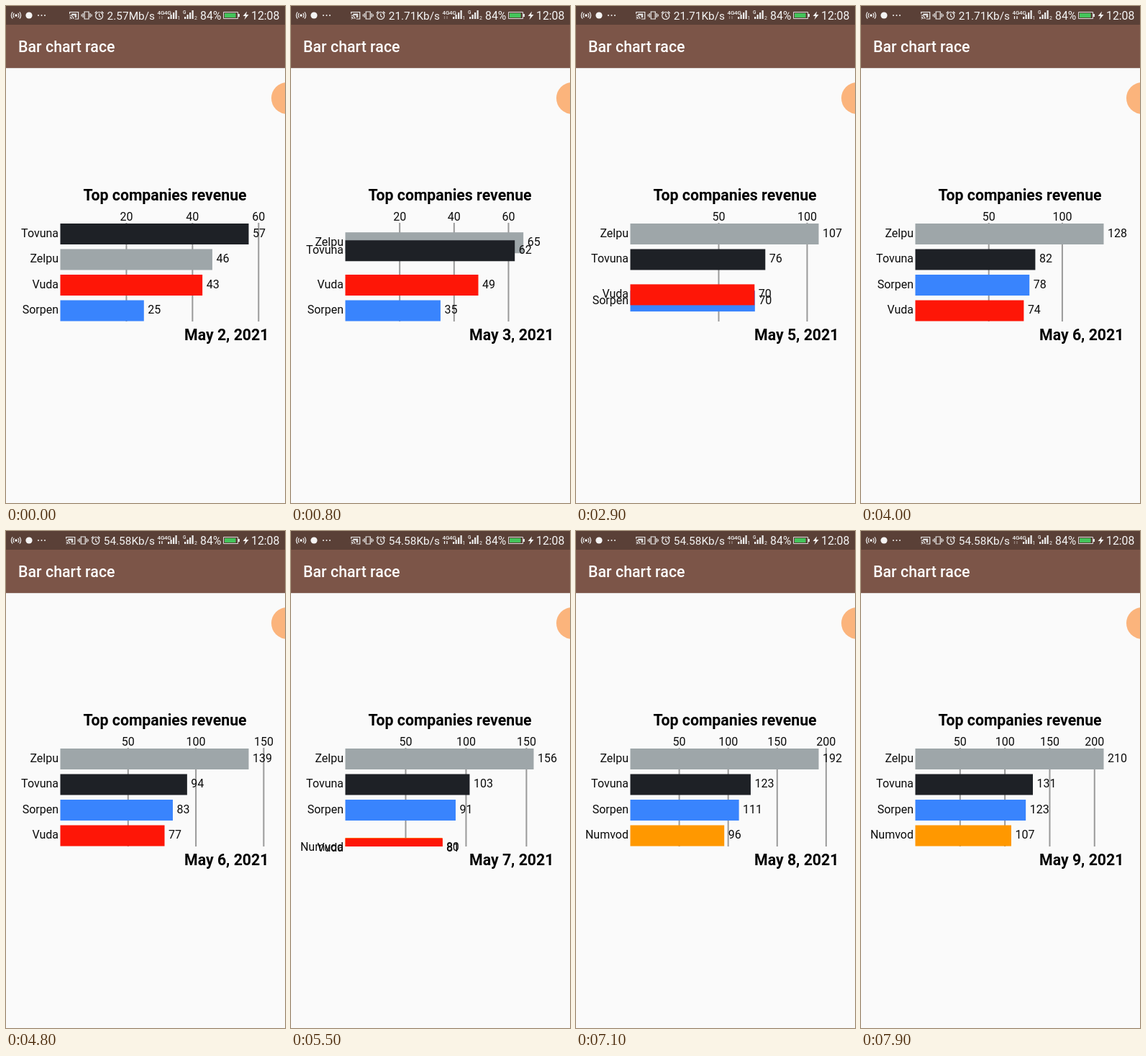
Animation, 388 px wide and 690 px high, one loop 8 s. Source, as an HTML page with a canvas:

```html
<!DOCTYPE html>
<html lang="en">
<head>
<meta charset="utf-8">
<title>Bar chart race</title>
<style>
  html, body { margin: 0; width: 100%; height: 100%; overflow: hidden; background: #fafafa; }
  canvas { display: block; }
</style>
</head>
<body>
<canvas id="stage" width="388" height="690"></canvas>
<script>
const ctx = document.getElementById('stage').getContext('2d');
const LOOP = 8000, FRAME = 100, ROW = 1220;
const LEFT = 75.5, TOP = 302, BOTTOM = 438, SLOT = 35.5, BAR = 29, FULL = 262;

// One value per day; days are joined by straight lines.
const series = [
  { name: 'Tovuna', color: '#1e2126', values: [57, 65.1, 76.2, 76.6, 94.7, 111, 125.6, 137.4] },
  { name: 'Zelpu', color: '#9ea6a9', values: [46, 75.7, 96.2, 123.6, 140, 171.5, 197, 224.8] },
  { name: 'Vuda', color: '#fe1607', values: [43, 52, 68.9, 72.5, 77.2, 83.9, 88, 92] },
  { name: 'Sorpen', color: '#3984fd', values: [25.3, 40.1, 67.5, 75.4, 83.5, 99, 113.6, 134] },
  { name: 'Numvod', color: '#ff9800', values: [20, 30, 40, 55, 70.3, 90, 97.3, 117.9] }
];

const mix = (a, b, f) => a + (b - a) * f;
const rank = (s, day) => series.filter(o => o.values[day] > s.values[day]).length;
const peak = day => Math.max(...series.map(s => s.values[day]));

function rect(x, y, w, h, color) {
  ctx.fillStyle = color;
  ctx.fillRect(x, y, w, h);
}

function circle(x, y, r, color) {
  ctx.fillStyle = color;
  ctx.beginPath();
  ctx.arc(x, y, r, 0, 7);
  ctx.fill();
}

function text(str, x, y, size = 16, align = 'left', weight = 400, color = '#0c0c0c') {
  ctx.font = `${weight} ${size}px Roboto, sans-serif`;
  ctx.textAlign = align;
  ctx.fillStyle = color;
  ctx.fillText(str, x, y);
}

function stroke(path, width = 1.2, color = '#eee') {
  ctx.strokeStyle = color;
  ctx.lineWidth = width;
  ctx.stroke(new Path2D(path));
}

function at(x, y, draw) {
  ctx.save();
  ctx.translate(x, y);
  draw();
  ctx.restore();
}

function signal(x) {
  for (let i = 0; i < 4; i++) rect(x + i * 3.5, 15 - i * 3, 2.2, 3 + i * 3, '#eee');
}

function statusBar(t) {
  const white = '#f4f4f4';
  rect(0, 0, 388, 26, '#5a4037');

  at(14, 13, () => {
    circle(0, 0, 1.7, white);
    stroke('M-2.6-3A4 4 0 0 0-2.6 3M2.6-3A4 4 0 0 1 2.6 3M-4.8-4.6A6.6 6.6 0 0 0-4.8 4.6M4.8-4.6A6.6 6.6 0 0 1 4.8 4.6');
  });
  circle(32, 13, 4.6, white);
  for (const x of [45, 49.5, 54]) circle(x, 13, 1, white);

  const speed = t < 400 ? '2.57Mb/s' : t < 4400 ? '21.71Kb/s' : '54.58Kb/s';
  text(speed, 207, 19, 15.4, 'right', 400, white);
  const x = 207 - ctx.measureText(speed).width;
  at(x - 46, 13, () => {
    stroke('M-6-2V-4.5H6V5H1M-6 4.8A2 2 0 0 1-5 5M-6 2.3A3 3 0 0 1-3.3 5M-6-.2A5.2 5.2 0 0 1-.8 5');
    rect(-3.5, -2.5, 7, 2.5, '#ddd');
    rect(1, 0, 2.5, 3, '#ddd');
  });
  at(x - 28.5, 13, () => stroke('M-3-5H3V5H-3ZM-5-3V3M5-3V3M-7-1.5V1.5M7-1.5V1.5'));
  at(x - 11, 13.5, () => stroke('M5 0A5 5 0 1 1-5 0A5 5 0 1 1 5 0M0-3V.5L2.3 2M-6-3.5L-3.3-6M6-3.5L3.3-6'));

  const busy = t >= 3900 && t < 6000;
  text('4G', 210.5, 12, 8, 'left', 500, white);
  text('4G', 220, 12, 8, 'left', 500, white);
  stroke('M213.5 18V14M217 14V18', 1.3, busy ? white : '#96847d');
  signal(225);
  text('1', 238.5, 19, 7, 'left', 400, white);
  text('G', 246, 11, 6.5, 'left', 500, white);
  signal(248);
  text('2', 262, 19, 7, 'left', 400, white);

  text('84%', 270, 19, 15.8, 'left', 400, white);
  stroke('M302.5 8.5H322.5V17.5H302.5Z', 1, '#ddd');
  rect(304, 10, 15.5, 6, '#43c35a');
  rect(323, 11, 2, 4, '#ddd');
  ctx.fillStyle = white;
  ctx.fill(new Path2D('M335 7.5L329.5 14H333L331.5 19L337.5 12H334Z'));
  text('12:08', 341, 19, 15.8, 'left', 400, white);
}

function chart(t) {
  const day = Math.floor(t / ROW), f = t / ROW - day;
  const max = mix(peak(day), peak(day + 1), f);
  const scale = FULL / max;

  text('Top companies revenue', 221, 270, 21.3, 'center', 700, '#000');

  const step = max < 100 ? 20 : 50;
  for (let v = step; v * scale < 286; v += step) {
    const x = LEFT + v * scale;
    rect(x - 1, 301, 2, BOTTOM - 301, '#9a9a9a');
    text(v, x, 298, 16, 'center');
  }

  [...series].sort((a, b) => rank(a, day + 1) - rank(b, day + 1)).forEach(s => {
    const value = mix(s.values[day], s.values[day + 1], f);
    const y = TOP + SLOT * mix(rank(s, day), rank(s, day + 1), f);
    if (y >= BOTTOM) return;
    const w = value * scale;
    rect(LEFT, y, w, Math.min(BAR, BOTTOM - y), s.color);
    text(s.name, 73, y + 18.5, 16, 'right');
    text(Math.round(value), LEFT + w + 5.5, y + 18.5);
  });

  text(`May ${Math.ceil(t / ROW) + 2}, 2021`, 365.5, 463.5, 21.3, 'right', 700, '#000');
}

function draw(now) {
  const t = Math.floor(now % LOOP / FRAME) * FRAME;
  rect(0, 0, 388, 690, '#fafafa');
  rect(0, 86, 388, 1, '#dedad8');
  rect(0, 26, 388, 60, '#7c5548');
  statusBar(t);
  text('Bar chart race', 17, 64, 21.4, 'left', 500, '#fff');
  circle(391, 128, 22, '#fbb47c');
  chart(t);
}

let start;
function tick(now) {
  start ??= now;
  draw(now - start);
  requestAnimationFrame(tick);
}
draw(0);
requestAnimationFrame(tick);
</script>
</body>
</html>
```
